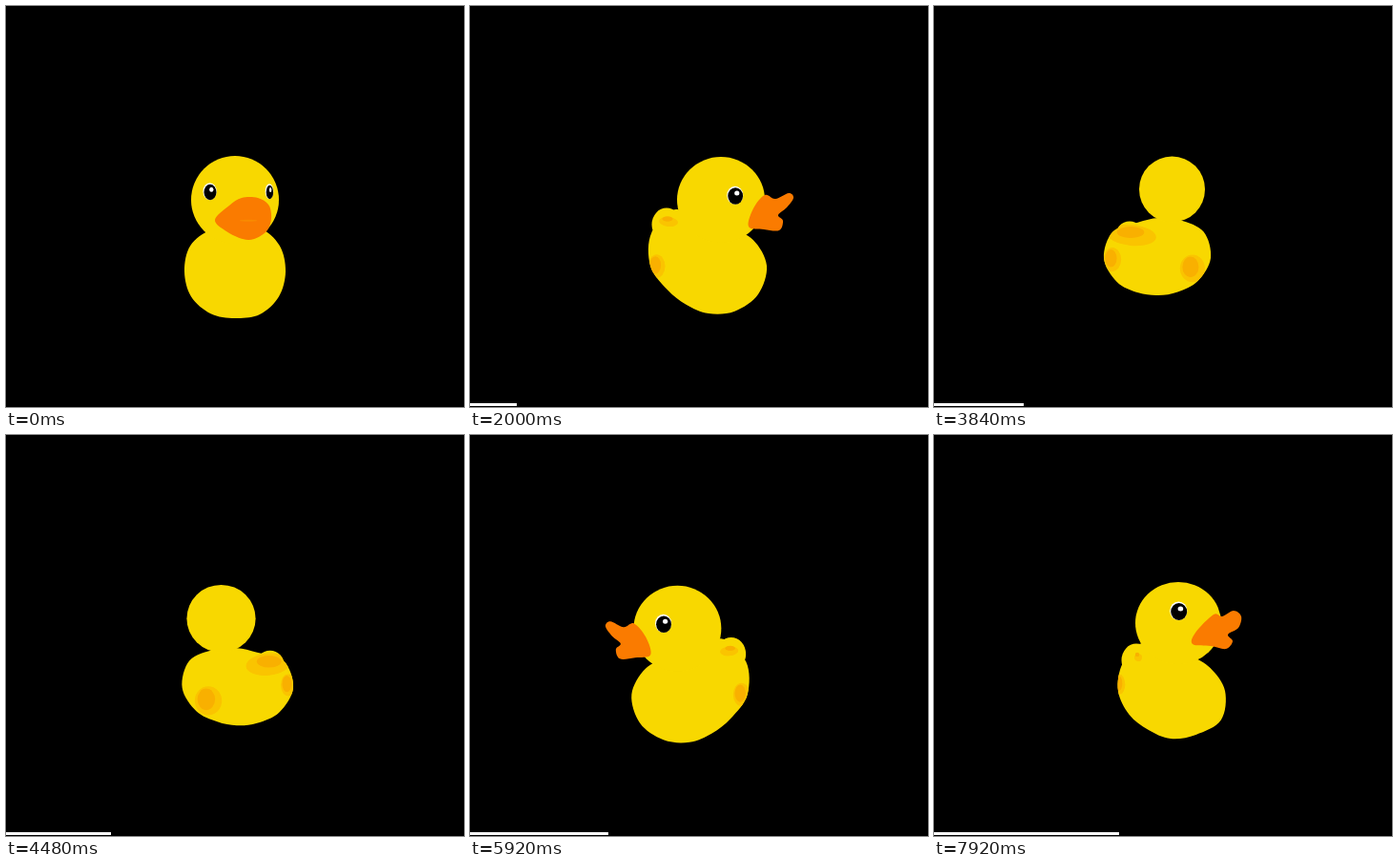
Write an HTML page with a canvas that moves like this. It is 480 px wide and 420 px high and loops after 8 s.

```html
<!DOCTYPE html>
<html lang="en">
<head>
<meta charset="utf-8">
<title>Turning duck</title>
<style>
html, body { margin: 0; width: 100%; height: 100%; overflow: hidden; background: #000; }
canvas { display: block; }
</style>
</head>
<body>
<canvas id="stage" width="480" height="420"></canvas>
<script>
const ctx = document.getElementById('stage').getContext('2d');
const YELLOW = '#f8d800', ORANGE = '#fa7b00', AMBER = '#fac400', DEEP = '#f9b000';
const LOOP = 8000, STEP = 80, RAD = Math.PI / 180;

// turn: [face, wings] in degrees, 0 = towards the viewer, 90 = right
// head: cx, cy, rx, ry, eye y;  tail: x, y, patch rx, patch ry
// body: cx, cy;  girth: radii clockwise from the top;  beak: outline, clockwise
const front = {
  turn: [12, 12], head: [240, 203, 46, 46, 195], tail: [240, 250, 0, 0], body: [240, 278],
  girth: [40, 52, 54, 53, 53, 52, 49, 51, 53, 53, 54, 50],
  beak: [234,209, 247,201, 264,201, 275,208, 278,218, 277,228, 272,237, 260,244, 248,244, 231,236, 219,224]
};
const gape = {
  turn: [74, 67], head: [263, 203, 46, 45, 199], tail: [206, 229, 10, 5], body: [250, 272],
  girth: [40, 45, 54, 61, 60, 55, 50, 47, 50, 61, 69, 68],
  beak: [309,198, 320,202, 334,196, 339,201, 332,211, 323,219, 328,225, 324,235, 308,234, 292,231, 297,212]
};
const side = {
  turn: [125, 113], head: [269, 198, 44, 43, 186], tail: [193, 240, 12, 14], body: [245, 268],
  girth: [40, 45, 64, 68, 59, 45, 41, 44, 57, 68, 71, 42],
  beak: [309,183, 313,180, 319,177, 327,180, 327,190, 318,200, 321,204, 317,208, 311,210, 306,205, 306,193]
};
const back = {
  turn: [165, 169], head: [249.5, 192, 34.5, 34.5, 185], tail: [205, 243, 26, 11], body: [235, 264],
  girth: [42, 46, 55, 55, 48, 41, 39, 42, 50, 57, 55, 43],
  beak: Array.from({ length: 22 }, (_, i) => i % 2 ? 192 : 250)
};
const left = {
  turn: [245, 227], head: [210, 193, 41, 38, 184], tail: [282, 244, 15, 13], body: [232, 267],
  girth: [40, 42, 62, 66, 56, 45, 41, 41, 52, 64, 64, 47],
  beak: [152,181, 158,178, 166,182, 173,184, 175,193, 175,205, 169,209, 162,208, 158,204, 163,200, 152,190]
};
const frontLeft = {
  turn: [348, 335], head: [227, 200, 45, 45, 190], tail: [272, 236, 4, 4], body: [233, 268],
  girth: [45, 60, 64, 58, 55, 53, 56, 57, 57, 57, 47, 40],
  beak: [193,201, 205,194, 220,195, 232,205, 243,214, 245,221, 240,230, 225,236, 210,238, 196,233, 189,216]
};
const right = {
  turn: [53, 53], head: [256, 197, 45, 43, 185], tail: [212, 236, 4, 4], body: [248, 268],
  girth: [40, 42, 48, 57, 61, 53, 50, 47, 50, 55, 58, 58],
  beak: [293,188, 302,190, 314,184, 322,190, 319,202, 308,209, 313,216, 306,224, 290,221, 271,219, 274,207]
};

const lerp = (a, b, u) => a + (b - a) * u;

function mix(p, q, u) {
  const r = {};
  for (const k in p) r[k] = p[k].map((v, i) => lerp(v, q[k][i], u));
  return r;
}

function mirror(p) {
  const flip = ([x, ...rest]) => [480 - x, ...rest];
  return {
    turn: p.turn.map(v => 360 - v),
    head: flip(p.head), tail: flip(p.tail), body: flip(p.body),
    girth: p.girth.map((_, i) => p.girth[(12 - i) % 12]),
    beak: p.beak.map((_, i) => {
      const j = (14 - (i >> 1)) % 11 * 2;
      return i % 2 ? p.beak[j + 1] : 480 - p.beak[j];
    })
  };
}

// Beak at its longest, seen square from the side
const profile = mix(gape, side, 0.62);
profile.beak = profile.beak.map((v, i) => i % 2 ? v : v + 9);
const parted = { ...front, beak: front.beak.map((v, i) => lerp(i % 2 ? 223 : 248, v, 1.15)) };

const keys = [
  [0, front], [880, parted], [2000, gape], [2500, profile], [2800, side],
  [3840, back], [4300, mirror(back)], [5040, left], [5350, mirror(profile)],
  [5900, mirror(gape)], [6250, mirror(right)], [6800, frontLeft],
  [7920, { ...right, turn: right.turn.map(v => v + 360) }]
];

function poseAt(t) {
  const i = Math.max(1, keys.findIndex(k => k[0] >= t));
  const [t0, p] = keys[i - 1], [t1, q] = keys[i];
  return mix(p, q, (t - t0) / (t1 - t0));
}

// Closed smooth curve through [x, y, x, y, ...]
function curve(pts) {
  const n = pts.length / 2, path = new Path2D();
  const at = (i, c) => pts[(i + n) % n * 2 + c];
  path.moveTo(pts[0], pts[1]);
  for (let i = 0; i < n; i++) {
    const near = c => at(i, c) + (at(i + 1, c) - at(i - 1, c)) / 6;
    const far = c => at(i + 1, c) - (at(i + 2, c) - at(i, c)) / 6;
    path.bezierCurveTo(near(0), near(1), far(0), far(1), at(i + 1, 0), at(i + 1, 1));
  }
  path.closePath();
  return path;
}

function oval(x, y, rx, ry, color, tilt = 0) {
  ctx.fillStyle = color;
  ctx.beginPath();
  ctx.ellipse(x, y, rx, ry, tilt, 0, 7);
  ctx.fill();
}

function drawBody({ turn, tail, body, girth }) {
  const [cx, cy] = body;
  const shape = curve(girth.flatMap((r, i) => {
    const a = i * 30 * RAD;
    return [cx + r * Math.sin(a), cy - r * Math.cos(a)];
  }));
  const [tx, ty, pw, ph] = tail;
  const bump = new Path2D();
  bump.ellipse(tx, ty, 15.5, 17.5, 0, 0, 7);
  shape.addPath(bump);
  ctx.fillStyle = YELLOW;
  ctx.fill(shape);

  ctx.save();
  ctx.clip(shape);
  const lean = Math.sign(cx - tx);
  oval(tx + lean * 2, ty - 3, pw, ph, AMBER, lean * 0.1);
  oval(tx + lean, ty - 6, pw * 0.55, ph * 0.55, DEEP);
  for (const s of [-1, 1]) {
    const az = (turn[1] + s * 130) * RAD, c = Math.cos(az);
    if (c < -0.2) continue;
    const x = cx + girth[s < 0 ? 9 : 3] * Math.sin(az), y = cy - 14 + 32 * c;
    const w = 3 + 13 * Math.abs(c), h = 9 + 7 * Math.max(0, c);
    oval(x, y, w, h, AMBER);
    oval(x - w * 0.15, y - h * 0.1, w * 0.65, h * 0.75, DEEP);
  }
  ctx.restore();
}

function drawBeak({ turn, beak }) {
  ctx.fillStyle = ORANGE;
  ctx.fill(curve(beak));
  if (Math.cos(turn[0] * RAD) < 0.9) return;
  const mid = c => beak.reduce((sum, v, i) => i % 2 === c ? sum + v / 11 : sum, 0);
  oval(mid(0) - 1, mid(1) + 2, 9, 1, '#f98a00');
}

function drawEyes({ turn, head }) {
  const [cx, , rx, , y] = head;
  for (const s of [-1, 1]) {
    const az = (turn[0] + s * 52) * RAD, c = Math.cos(az);
    if (c < 0.05) continue;
    const x = cx + 0.88 * rx * Math.sin(az);
    const w = 8.5 * Math.max(c, 0.38), h = 5.8 + 3.2 * c;
    oval(x - 0.4, y - 0.8, w + 0.6, h + 0.8, '#fff');
    oval(x, y, w, h, '#000');
    oval(x + w * 0.2, y - h * 0.33, w * 0.33, 2.5, '#fff');
  }
}

function draw(t) {
  const pose = poseAt(t), [hx, hy, rx, ry] = pose.head;
  const facing = Math.cos(pose.turn[0] * RAD) > 0;
  ctx.fillStyle = '#000';
  ctx.fillRect(0, 0, 480, 420);
  drawBody(pose);
  if (!facing) drawBeak(pose);
  oval(hx, hy, rx, ry, YELLOW);
  drawEyes(pose);
  if (facing) drawBeak(pose);
  ctx.fillStyle = '#fff';
  ctx.fillRect(0, 416, Math.round(t * 0.0245), 3);
}

const start = performance.now();
function tick() {
  const t = (performance.now() - start) % LOOP;
  draw(Math.floor(t / STEP) * STEP);
  requestAnimationFrame(tick);
}
tick();
</script>
</body>
</html>
```
